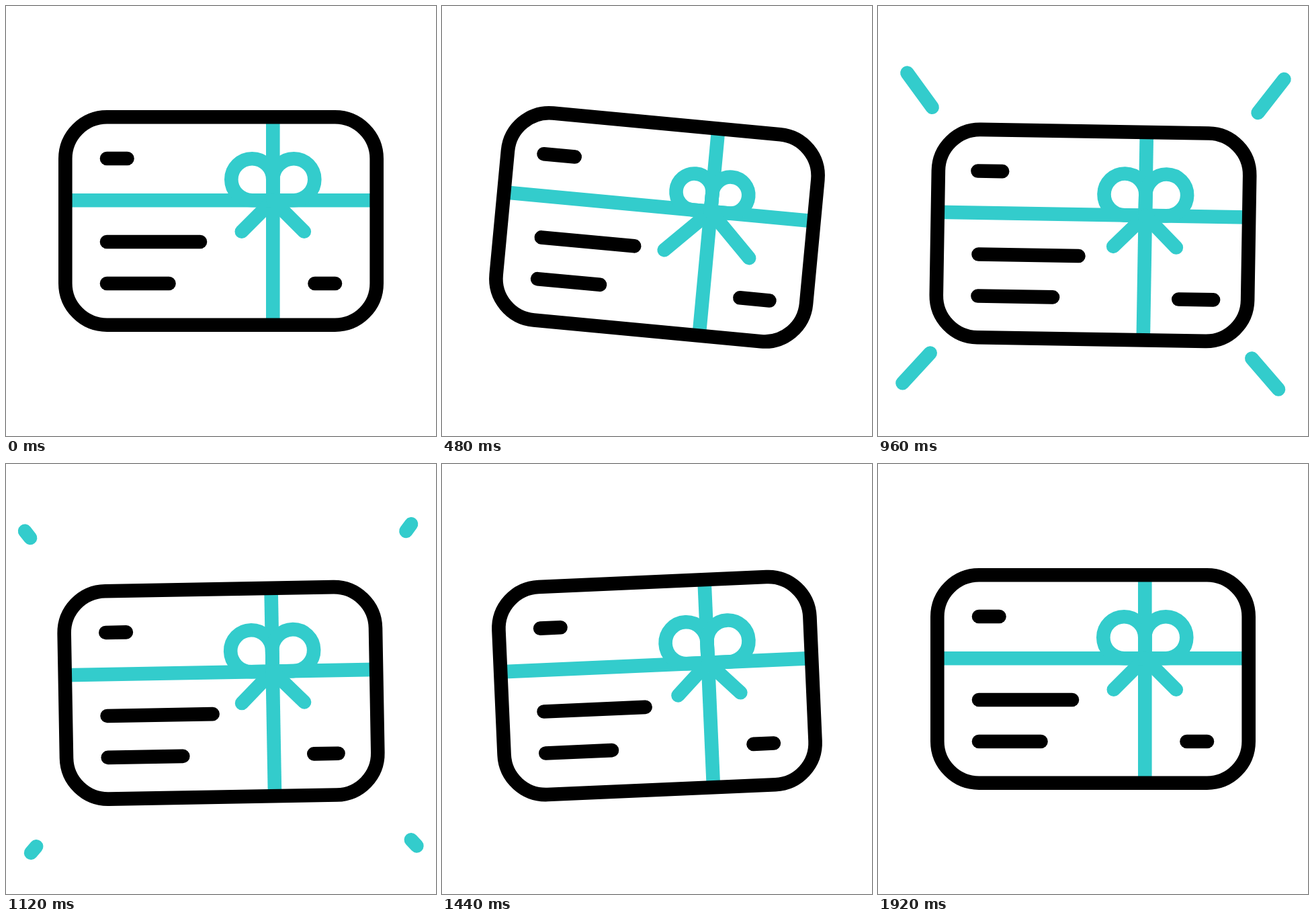
These frames come from a looping animation (640 px wide and 640 px high, 2000 ms). An HTML page with a canvas:

```html
<!DOCTYPE html>
<html lang="en">
<head>
<meta charset="utf-8">
<title>Gift card</title>
<style>
  html, body { margin: 0; width: 100%; height: 100%; overflow: hidden; background: #fff; }
  canvas { display: block; width: 100vw; height: 100vh; }
</style>
</head>
<body>
<canvas id="stage"></canvas>
<script>
const SIZE = 640, LOOP = 2000, STEP = 40;
const TEAL = '#33cccc', INK = '#000', LINE = 20.6;
const canvas = document.getElementById('stage');
const ctx = canvas.getContext('2d');

// Eased progress from 0 to 1 between two times
function ease(t, from, to) {
  const u = Math.min(1, Math.max(0, (t - from) / (to - from)));
  return u * u * (3 - 2 * u);
}

// Rise to 1 at the peak, then fall back to 0
const pulse = (t, start, peak, end) => ease(t, start, peak) - ease(t, peak, end);

function stroke(color, cap, trace) {
  ctx.strokeStyle = color;
  ctx.lineCap = cap;
  ctx.beginPath();
  trace();
  ctx.stroke();
}

function line(x1, y1, x2, y2, color, cap = 'round') {
  stroke(color, cap, () => {
    ctx.moveTo(x1, y1);
    ctx.lineTo(x2, y2);
  });
}

function tilt(t) {
  const right = 5.35 * (ease(t, 0, 450) - ease(t, 770, 1030));
  const left = 3.15 * pulse(t, 1030, 1265, 1870);
  return (right - left) * Math.PI / 180;
}

const drop = t => 21.4 * (ease(t, 200, 810) - ease(t, 1050, 1800));

function rays(t) {
  const head = ease(t, 520, 1080), tail = ease(t, 850, 1200);
  if (head <= tail) return;
  const corners = [
    { x: 228.7, y: -168.4, dx: 58.8, dy: -77.9 },
    { x: 224.7, y: 162.7, dx: 62.5, dy: 70 }
  ];
  for (const { x, y, dx, dy } of corners) {
    for (const side of [-1, 1]) {
      line(side * (x + dx * tail), y + dy * tail,
           side * (x + dx * head), y + dy * head, TEAL);
    }
  }
}

function bow(t) {
  const pull = pulse(t, 0, 510, 1000);
  const r = 31 * (1 - 0.13 * pull);
  const reach = 46.5 * (1 + 0.37 * pull);
  ctx.save();
  ctx.translate(77.3, -30.8);
  for (const side of [-1, 1]) {
    stroke(TEAL, 'butt', () => {
      ctx.moveTo(0, 0);
      ctx.lineTo(0, -r);
      ctx.arc(side * r, -r, r, side < 0 ? 0 : Math.PI, Math.PI / 2, side < 0);
      ctx.closePath();
    });
    line(0, 0, side * reach, reach, TEAL);
  }
  ctx.restore();
}

function labels(t) {
  const a = 10.5 * pulse(t, 140, 640, 1140);
  const b = 20 * pulse(t, 700, 1220, 1740);
  const c = 20 * pulse(t, 400, 1040, 1680);
  const d = 14 * pulse(t, 140, 830, 1240);
  line(-170 - a, -93, -139.5 + a, -93, INK);
  line(-170, 31, -31 + b, 31, INK);
  line(-170, 93, -77.5 + c, 93, INK);
  line(139.5 - d, 93, 170 + d, 93, INK);
}

function draw(t) {
  const k = canvas.width / SIZE;
  ctx.setTransform(k, 0, 0, canvas.height / SIZE, 0, 0);
  ctx.fillStyle = '#fff';
  ctx.fillRect(0, 0, SIZE, SIZE);
  ctx.lineWidth = LINE;
  ctx.lineJoin = 'miter';
  ctx.translate(320, 320 + drop(t));
  ctx.rotate(tilt(t));
  rays(t);
  line(-231, -30.8, 231, -30.8, TEAL, 'butt');
  line(77.3, -154, 77.3, 154, TEAL, 'butt');
  bow(t);
  stroke(INK, 'butt', () => ctx.roundRect(-231.7, -154.7, 463.4, 309.4, 62));
  labels(t);
}

function resize() {
  const dpr = window.devicePixelRatio || 1;
  canvas.width = Math.round((innerWidth || SIZE) * dpr);
  canvas.height = Math.round((innerHeight || SIZE) * dpr);
}

const begin = performance.now();
function tick() {
  const t = (performance.now() - begin) % LOOP;
  draw(Math.floor(t / STEP) * STEP);
  requestAnimationFrame(tick);
}

addEventListener('resize', resize);
resize();
tick();
</script>
</body>
</html>
```
